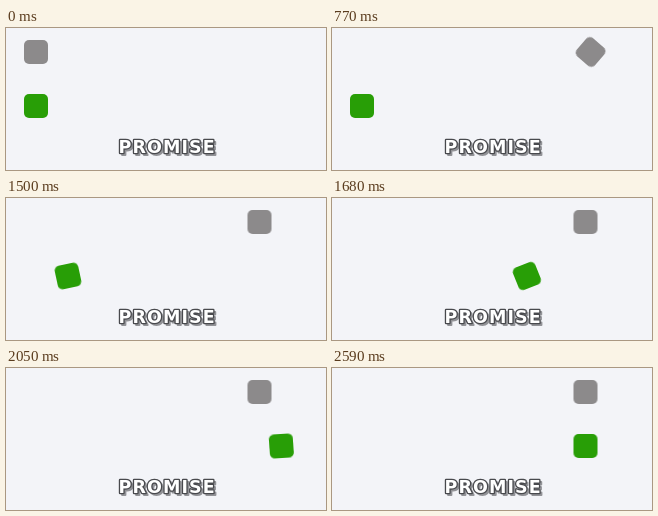
Write an HTML page that moves like this. It is 320 by 142 pixels and loops after 2.87 s.

```html
<!DOCTYPE html>
<html lang="en">
<head>
<meta charset="utf-8">
<title>Promise</title>
<style>
  html, body { margin: 0; width: 100%; height: 100%; overflow: hidden; background: #f3f4f8; }
  .box { position: absolute; left: 18px; width: 24px; height: 24px; border-radius: 5px; }
  #first { top: 11.6px; background: #8c8a8b; }
  #second { top: 66.2px; background: #289e06; }
  svg { position: absolute; left: 0; top: 0; }
  text {
    font: 700 17.5px "DejaVu Sans", sans-serif;
    letter-spacing: 1.1px;
    text-anchor: middle;
    stroke-linejoin: round;
    paint-order: stroke;
  }
  .shadow { fill: #929397; stroke: #929397; stroke-width: 2; }
  .label { fill: #fff; stroke: #48494d; stroke-width: 2.6; }
</style>
</head>
<body>
<svg width="320" height="142">
  <text class="shadow" x="163.2" y="127">PROMISE</text>
  <text class="label" x="161.2" y="125">PROMISE</text>
</svg>
<div class="box" id="first"></div>
<div class="box" id="second"></div>
<script>
  const LOOP = 2870;
  const STEP = 1000 / 22;
  const TRAVEL = 223.5;

  // Each box rolls five turns to the right; it stays still until `show`.
  function roll(id, start, show) {
    const anim = document.getElementById(id).animate(
      [{ transform: 'translateX(0px) rotate(0deg)' },
       { transform: `translateX(${TRAVEL}px) rotate(1800deg)` }],
      { duration: 1000, easing: 'cubic-bezier(.34, 1.56, .64, 1)', fill: 'both' }
    );
    anim.pause();
    return t => { anim.currentTime = t < show ? 0 : Math.min(t - start, 1000); };
  }

  const rolls = [roll('first', 381, 440), roll('second', 1467.5, 1490)];

  function draw(now) {
    const t = Math.floor((now % LOOP + 5) / STEP) * STEP;
    rolls.forEach(seek => seek(t));
  }

  const origin = performance.now();
  function tick() {
    draw(performance.now() - origin);
    requestAnimationFrame(tick);
  }
  tick();
</script>
</body>
</html>
```
